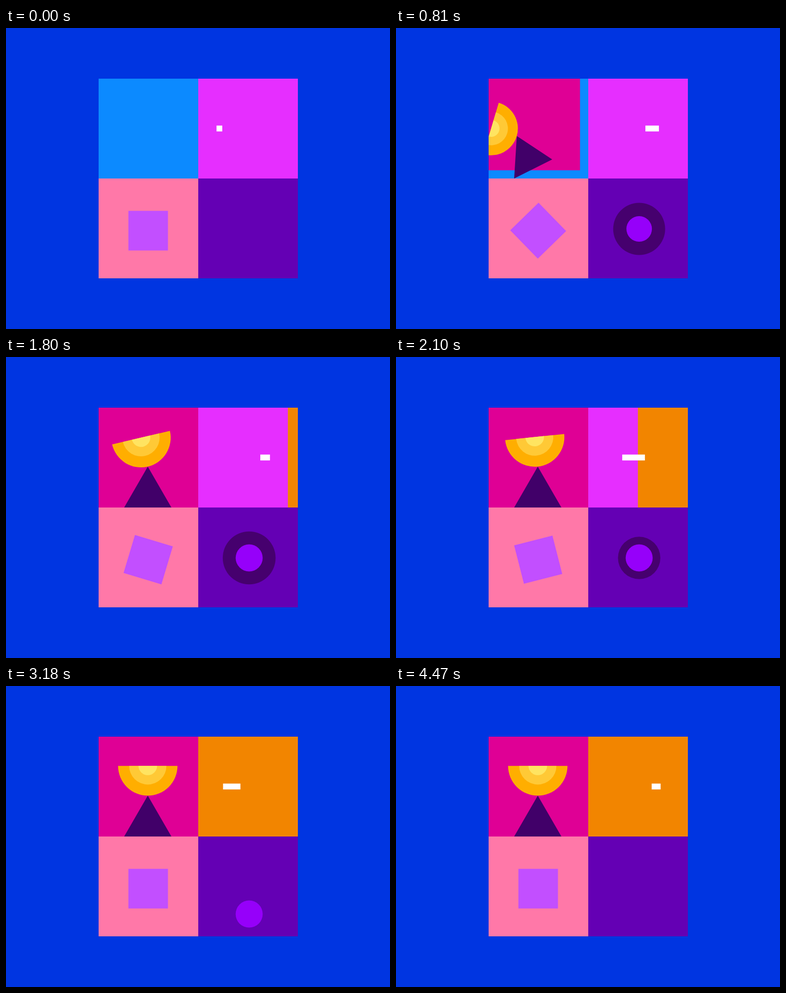
These frames come from a looping animation (767x600 px, 4500 ms). An HTML page with a canvas:

```html
<!DOCTYPE html>
<html lang="en">
<head>
<meta charset="utf-8">
<title>Four tiles</title>
<style>
  html, body { margin: 0; width: 100%; height: 100%; overflow: hidden; background: #0035e1; }
  canvas { display: block; }
</style>
</head>
<body>
<canvas id="stage" width="767" height="600"></canvas>
<script>
const ctx = document.getElementById('stage').getContext('2d');
const LOOP = 4500, TILE = 199, LEFT = 185, TOP = 101, MIDX = 384, MIDY = 300;
const RAD = Math.PI / 180;

const clamp = v => Math.min(1, Math.max(0, v));

// Cubic bezier easing with control points (a, 0) and (b, 1)
function bezier(a, b) {
  return x => {
    if (x <= 0 || x >= 1) return clamp(x);
    let lo = 0, hi = 1;
    for (let i = 0; i < 24; i++) {
      const s = (lo + hi) / 2, r = 1 - s;
      if (3 * a * s * r * r + 3 * b * s * s * r + s * s * s < x) lo = s; else hi = s;
    }
    return lo * lo * (3 - 2 * lo);
  };
}

const smooth = x => x * x * (3 - 2 * x);
const cubicOut = x => 1 - (1 - x) ** 3;
const expoOut = x => x >= 1 ? 1 : 1 - 2 ** (-10 * x);
const move = (ease, start, length) => t => ease(clamp((t - start) / length));

const pinkGrow = move(expoOut, 331, 1335);
const triGrow = move(cubicOut, 244, 1056);
const triTurn = move(cubicOut, 374, 926);
const wipe = move(bezier(.5, .5), 1515, 1170);
const spinA = move(bezier(.7, .4), 0, 1275);
const spinB = move(bezier(.9, .4), 1275, 1398);
const ringGrow = move(expoOut, 147, 1335);
const ringShrink = move(bezier(.7, .3), 1634, 1200);
const dotGrow = move(expoOut, 256, 1335);
const dotFall = move(bezier(.8, .2), 2212, 2193);

// Bar edges run right, then back; the leading edge is always quicker
const BAR_CYCLE = 2700;
const rightOut = move(bezier(.6, .3), 0, 1176), rightBack = move(bezier(.8, .4), 1350, 1412);
const leftOut = move(bezier(.7, .15), 0, 1550), leftBack = move(bezier(.7, .4), 1350, 1231);

function edge(t, out, back) {
  let p = 0;
  for (let start = 0; start < LOOP; start += BAR_CYCLE) p += out(t - start) - back(t - start);
  return p * 103.5;
}

const ROCK = [[430, -90], [1320, 19.3], [1850, -14], [2380, 3.5], [2650, 0]];

function rock(t) {
  if (t <= ROCK[0][0]) return ROCK[0][1];
  for (let i = 1; i < ROCK.length; i++) {
    const [t0, a] = ROCK[i - 1], [t1, b] = ROCK[i];
    if (t < t1) return a + (b - a) * smooth((t - t0) / (t1 - t0));
  }
  return 0;
}

function rect(color, x, y, w, h = w) {
  ctx.fillStyle = color;
  ctx.fillRect(x, y, w, h);
}

function disc(color, x, y, r, end = 2 * Math.PI) {
  if (r <= 0) return;
  ctx.fillStyle = color;
  ctx.beginPath();
  ctx.arc(x, y, r, 0, end);
  ctx.fill();
}

function tile(color, x, y, paint) {
  ctx.save();
  ctx.beginPath();
  ctx.rect(x, y, TILE, TILE);
  ctx.clip();
  rect(color, x, y, TILE);
  paint();
  ctx.restore();
}

function bowlTile(t) {
  rect('#df0095', LEFT, TOP, TILE * pinkGrow(t));
  const size = triGrow(t);
  if (!size) return;
  ctx.translate(236, 300);
  ctx.rotate(-180 * RAD * (1 - triTurn(t)));
  ctx.scale(size, size);
  ctx.fillStyle = '#410069';
  ctx.beginPath();
  ctx.moveTo(0, 0);
  ctx.lineTo(47.2, -81.5);
  ctx.lineTo(94.4, 0);
  ctx.fill();
  ctx.translate(47.2, -81.5);
  ctx.rotate(rock(t) * RAD);
  disc('#ffae00', 0, -59.3, 59.3, Math.PI);
  disc('#ffc936', 0, -59.3, 37.2, Math.PI);
  disc('#ffe461', 0, -59.3, 18.6, Math.PI);
}

function barTile(t) {
  const w = TILE * wipe(t);
  rect('#f28500', MIDX + TILE - w, TOP, w, TILE);
  const l = 420.5 + edge(t, leftOut, leftBack);
  const r = 432 + edge(t, rightOut, rightBack);
  rect('#fff', l, 194.5, r - l, 11.7);
}

function squareTile(t) {
  ctx.translate(284, 404);
  ctx.rotate(180 * RAD * (spinA(t) + spinB(t)));
  rect('#c24fff', -39.5, -39.5, 79);
}

function ringTile(t) {
  disc('#46006e', 485.7, 400.5, 53.6 * ringGrow(t) * (1 - ringShrink(t)));
  disc('#9600fa', 485.7, 400.5 + TILE * dotFall(t), 27 * dotGrow(t));
}

function draw(t) {
  rect('#0035e1', 0, 0, 767, 600);
  tile('#0c8aff', LEFT, TOP, () => bowlTile(t));
  tile('#e62eff', MIDX, TOP, () => barTile(t));
  tile('#ff78a8', LEFT, MIDY, () => squareTile(t));
  tile('#6400b4', MIDX, MIDY, () => ringTile(t));
}

const begin = performance.now();
function tick() {
  draw((performance.now() - begin) % LOOP);
  requestAnimationFrame(tick);
}
tick();
</script>
</body>
</html>
```
